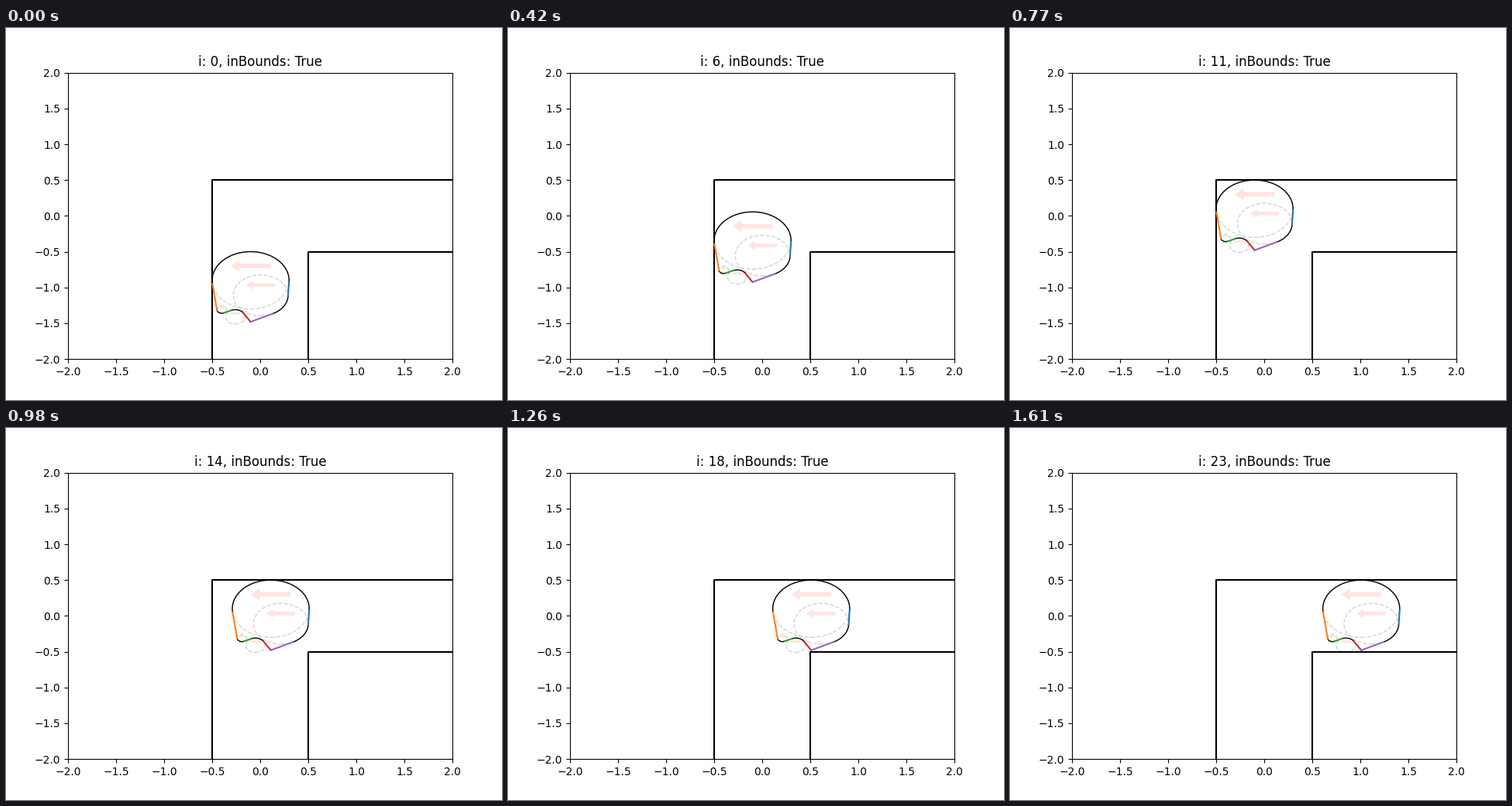
A matplotlib script that plays this animation: 640 px wide and 480 px high, repeating every 1.68 s.

```python
import matplotlib.pyplot as plt
import numpy as np
from matplotlib.animation import FuncAnimation
from matplotlib.patches import Circle
from matplotlib.transforms import Affine2D

FRAMES, STEP_MS = 24, 70

# x, y, radius; a negative radius turns clockwise (outside the belt)
PULLEYS = [
    (0.005, -1.11, 0.285),
    (-0.1, -0.9, 0.4),
    (-0.4, -1.31, 0.05),
    (-0.26, -1.41, -0.1),
    (-0.1, -1.48, 0.0),
]

fig, ax = plt.subplots(figsize=(6.4, 4.8), dpi=100)
shift = Affine2D()
moving = shift + ax.transData


def tangent(a, b):
    """Angle of the belt's straight run from pulley a to pulley b."""
    dx, dy = b[0] - a[0], b[1] - a[1]
    return np.arctan2(dy, dx) + np.arcsin((a[2] - b[2]) / np.hypot(dx, dy))


def touch(pulley, theta):
    """Point where a run with angle theta meets the pulley."""
    x, y, r = pulley
    return x + r * np.sin(theta), y - r * np.cos(theta)


def draw_pulley(x, y, r):
    size, side = abs(r), np.sign(r)
    ax.add_patch(Circle((x, y), size, fill=False, ec="lightgray", ls="--",
                        transform=moving))
    ax.arrow(x + r / 2, y + size / 2, -r, 0, width=0.12 * size,
             head_width=0.36 * size, head_length=0.2 * size,
             length_includes_head=True, color="mistyrose", transform=moving)


def draw_belt():
    n = len(PULLEYS)
    runs = [tangent(PULLEYS[k], PULLEYS[(k + 1) % n]) for k in range(n)]
    for k, pulley in enumerate(PULLEYS):
        start, end = runs[k - 1], runs[k]
        if pulley[2]:
            turn = 1 if pulley[2] > 0 else -1
            sweep = turn * ((turn * (end - start)) % (2 * np.pi))
            arc = start + sweep * np.linspace(0, 1, 100)
            ax.plot(*touch(pulley, arc), "k", lw=1, transform=moving)
    for k, theta in enumerate(runs):
        ends = touch(PULLEYS[k], theta), touch(PULLEYS[(k + 1) % n], theta)
        ax.plot(*zip(*ends), color=f"C{k}", lw=1.5, transform=moving)


def offset(i):
    """Climb to the top wall, then slide along it to the right."""
    rise = np.clip((i - 1) / 9, 0, 1)
    slide = 0.1 * (i - 12) + 0.01 if i >= 12 else 0
    return slide, rise


def update(i):
    shift.clear().translate(*offset(i))
    ax.set_title(f"i: {i}, inBounds: True")


for corner in (-0.5, 0.5):
    ax.plot([corner, corner, 2], [-2, -corner, -corner], "k", lw=1.5)
for pulley in PULLEYS:
    if pulley[2]:
        draw_pulley(*pulley)
draw_belt()
ax.set(xlim=(-2, 2), ylim=(-2, 2))

anim = FuncAnimation(fig, update, frames=FRAMES, interval=STEP_MS,
                     init_func=lambda: update(0), repeat=True, repeat_delay=0)
plt.show()
```
